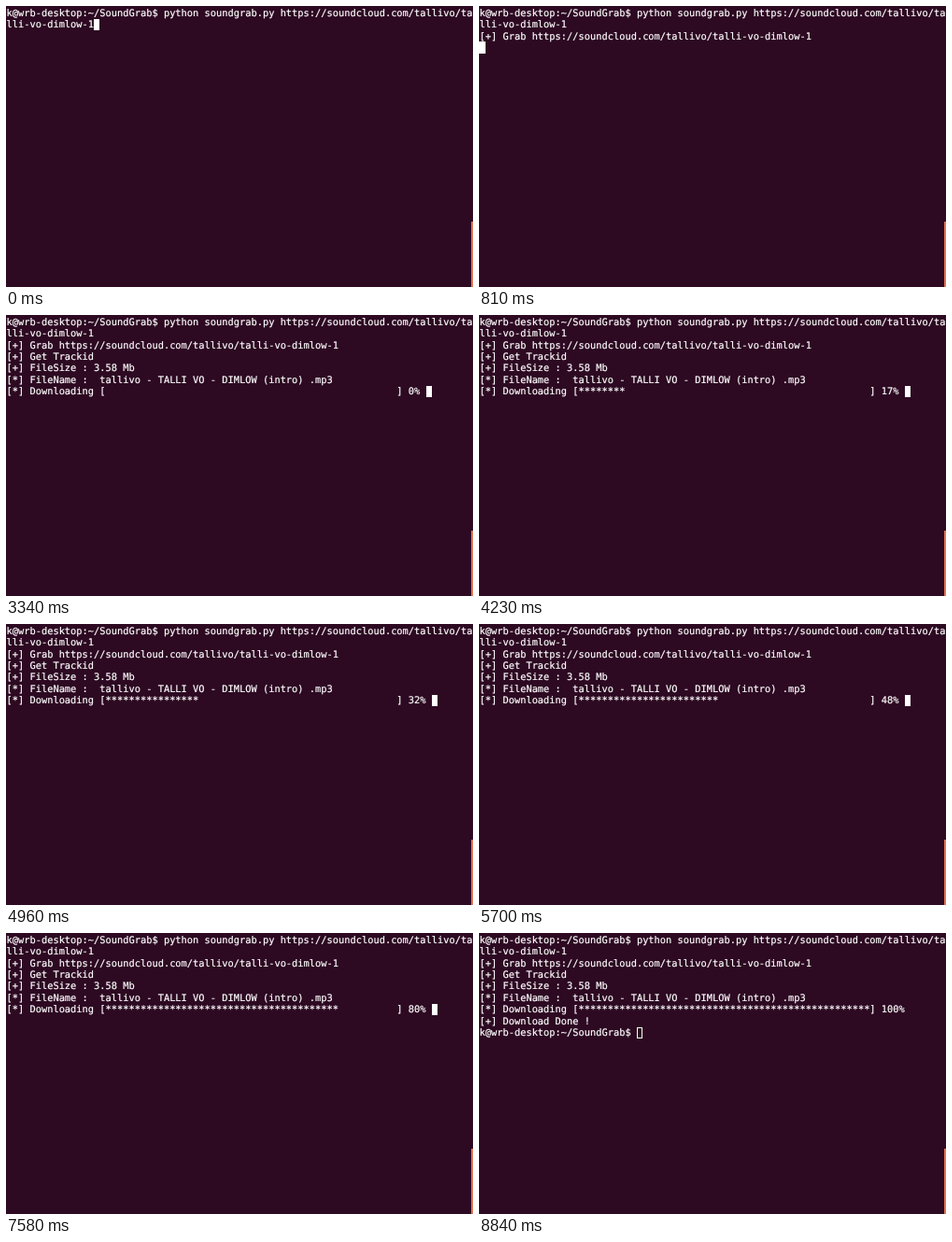
Animation, 500 px wide and 301 px high, one loop 8860 ms. Source, as an HTML page:

```html
<!DOCTYPE html>
<html lang="en">
<head>
<meta charset="utf-8">
<title>Terminal download</title>
<style>
  html, body { margin: 0; width: 100%; height: 100%; overflow: hidden; background: #2d0922; }
  #stage { position: relative; width: 500px; height: 301px; overflow: hidden; }
  #screen {
    position: absolute; left: .5px; top: 1.6px; margin: 0; color: #fff;
    font: 10.365px/12.45px "DejaVu Sans Mono", monospace;
    -webkit-text-stroke: .2px #fff;
    text-rendering: geometricPrecision; font-variant-ligatures: none;
  }
  #cursor { position: absolute; width: 6.3px; height: 12.45px; box-sizing: border-box; background: #fff; }
  #cursor.hollow { background: none; border: 1px solid #fff; }
  #scrollbar { position: absolute; left: 498px; top: 231px; width: 2px; height: 70px; background: #e0714f; }
</style>
</head>
<body>
<div id="stage">
  <pre id="screen"></pre>
  <div id="cursor"></div>
  <div id="scrollbar"></div>
</div>
<script>
const LOOP = 8860, COL = 6.24, ROW = 12.45, BLINK = 148;
const ENTER = 70, BAR_START = 2720, DONE = 8640;
const screen = document.getElementById("screen");
const cursor = document.getElementById("cursor");

const prompt = "k@wrb-desktop:~/SoundGrab$ ";
const url = "https://soundcloud.com/tallivo/talli-vo-dimlow-1";
const command = prompt + "python soundgrab.py " + url;

// Output lines with the time each one is printed
const output = [
  [190, "[+] Grab " + url],
  [930, "[+] Get Trackid"],
  [2620, "[+] FileSize : 3.58 Mb"],
  [2680, "[*] FileName :  tallivo - TALLI VO - DIMLOW (intro) .mp3"],
];

// Steady stretches of the download; it stalls before the last one
const runs = [
  { from: 3340, to: 4960, low: 0, high: 32.2 },
  { from: 4960, to: 6240, low: 32.2, high: 60 },
  { from: 7230, to: 8500, low: 73, high: 100 },
];

function percentAt(t) {
  const run = runs.filter(r => r.from <= t).pop();
  if (!run) return 0;
  const part = Math.min(1, (t - run.from) / (run.to - run.from));
  return Math.floor(run.low + (run.high - run.low) * part);
}

function draw(t) {
  const lines = [command.slice(0, 80), command.slice(80)];
  let row = 1, col = lines[1].length, written = 0;
  if (t >= ENTER) { row = 2; col = 0; written = ENTER; }
  for (const [time, text] of output) {
    if (t >= time) { row = lines.push(text); written = time; }
  }
  if (t >= BAR_START) {
    const percent = percentAt(t);
    const bar = "*".repeat(percent / 2).padEnd(50);
    const text = `[*] Downloading [${bar}] ${percent}% `;
    row = lines.push(text) - 1;
    col = text.length;
    written = t;
  }
  if (t >= DONE) {
    row = lines.push("[+] Download Done !", prompt) - 1;
    col = prompt.length;
  }
  const text = lines.join("\n");
  if (screen.textContent !== text) screen.textContent = text;

  // Each write restarts the blink with the cursor shown
  const visible = Math.floor((t - written) / BLINK) % 2 === 0;
  cursor.style.visibility = visible ? "visible" : "hidden";
  cursor.style.left = .4 + col * COL + "px";
  cursor.style.top = 1.1 + row * ROW + "px";
  cursor.className = t >= DONE ? "hollow" : "";
}

const start = performance.now();
function tick() {
  draw((performance.now() - start) % LOOP);
  requestAnimationFrame(tick);
}
tick();
</script>
</body>
</html>
```
